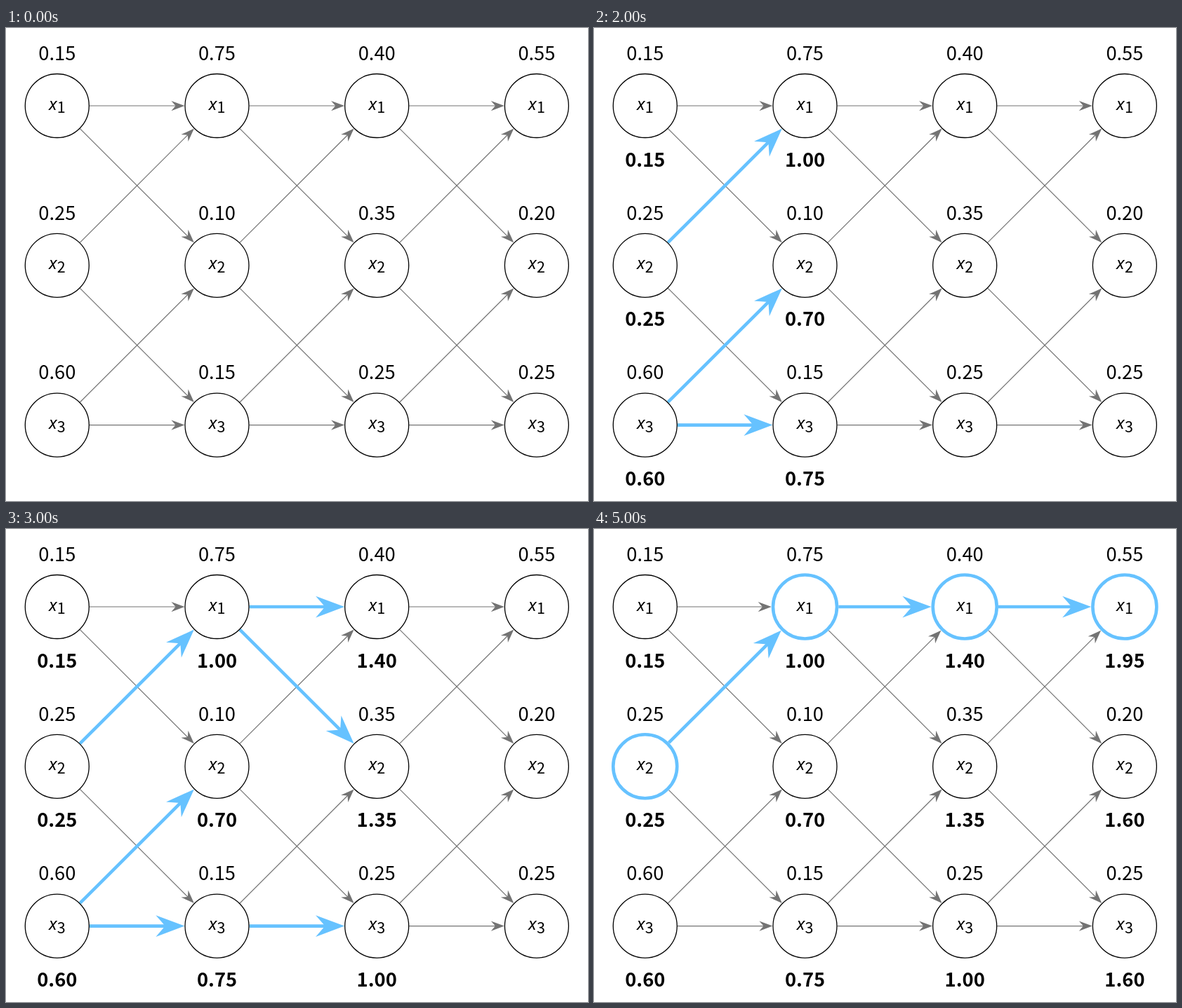
These frames come from a looping animation (829 px wide and 675 px high, 6 s). An HTML page:

```html
<!DOCTYPE html>
<html lang="en">
<head>
<meta charset="utf-8">
<title>Best path through a trellis</title>
<style>
  html, body { margin: 0; width: 100%; height: 100%; overflow: hidden; background: #fff; }
  svg { display: block; width: 829px; height: 675px; }
  text { font: 27.3px "Noto Sans CJK JP", "Noto Sans CJK", "Noto Sans", sans-serif; text-anchor: middle; }
  .score { font-weight: 700; }
  .state { font: italic 24px "Noto Sans", "Open Sans", sans-serif; }
  .index { font-size: 21.5px; }
</style>
</head>
<body>
<svg id="stage" viewBox="0 0 829 675"></svg>
<script>
const BLUE = "#66c2ff", GRAY = "#737373";
const THIN = 1.2, THICK = 4.6, RADIUS = 45.5;
const STEP = 1000, STEPS = 6;
const weights = [[0.15, 0.25, 0.60], [0.75, 0.10, 0.15], [0.40, 0.35, 0.25], [0.55, 0.20, 0.25]];
const sources = [[0, 1], [0, 2], [1, 2]];   // rows that lead into each row

// Each node keeps its best total and the row it came from.
const nodes = [];
weights.forEach((column, c) => {
  nodes.push(column.map((weight, r) => {
    const node = { weight, total: weight, x: 72.8 + 227.7 * c, y: 111 + 227.8 * r };
    if (c) {
      const before = nodes[c - 1];
      node.from = sources[r].reduce((a, b) => before[b].total > before[a].total ? b : a);
      node.total += before[node.from].total;
    }
    return node;
  }));
});

const bestPath = new Set();
let best = nodes[3].reduce((a, b) => b.total > a.total ? b : a);
for (let c = 3; c >= 0; c--) {
  bestPath.add(best);
  if (c) best = nodes[c - 1][best.from];
}

function arrow(a, b, startGap, endGap, bold) {
  const color = bold ? BLUE : GRAY, width = bold ? THICK : THIN;
  const length = bold ? 41 : 19, half = length * 0.375, notch = length * 0.675;
  const dx = b.x - a.x, dy = b.y - a.y, end = Math.hypot(dx, dy) - endGap;
  const angle = Math.atan2(dy, dx) * 180 / Math.PI;
  return `<g transform="translate(${a.x} ${a.y}) rotate(${angle})">
    <path d="M${startGap} 0H${end - notch + 1}" stroke="${color}" stroke-width="${width}"/>
    <path d="M${end} 0l${-length} ${half}l${length - notch} ${-half}l${notch - length} ${-half}z" fill="${color}"/></g>`;
}

function label(x, y, text, kind = "") {
  return `<text x="${x}" y="${y}" class="${kind}">${text}</text>`;
}

function draw(step) {
  const final = step === STEPS - 1;
  const ring = node => final && bestPath.has(node) ? THICK : THIN;
  const gap = node => RADIUS + ring(node) / 2;
  let plain = "", bold = "", circles = "";

  nodes.forEach((column, c) => column.forEach((node, r) => {
    const { x, y } = node, marked = ring(node) === THICK;
    if (c) for (const row of sources[r]) {
      const source = nodes[c - 1][row];
      const chosen = row === node.from && (final ? marked : step > c);
      const line = arrow(source, node, gap(source), gap(node), chosen);
      if (chosen) bold += line; else plain += line;
    }
    circles += `<circle cx="${x}" cy="${y}" r="${RADIUS}" fill="none" stroke="${marked ? BLUE : "#000"}" stroke-width="${marked ? THICK : 1.3}"/>`
      + label(x, y - 65.2, node.weight.toFixed(2))
      + label(x - 6, y + 5.5, "x", "state")
      + label(x + 6, y + 10, r + 1, "index");
    if (step > c) circles += label(x, y + 86.5, node.total.toFixed(2), "score");
  }));
  stage.innerHTML = plain + bold + circles;
}

const stage = document.getElementById("stage");
const start = performance.now();
let shown = -1;
function tick() {
  const step = Math.floor((performance.now() - start) / STEP) % STEPS;
  if (step !== shown) draw(shown = step);
  requestAnimationFrame(tick);
}
tick();
</script>
</body>
</html>
```
